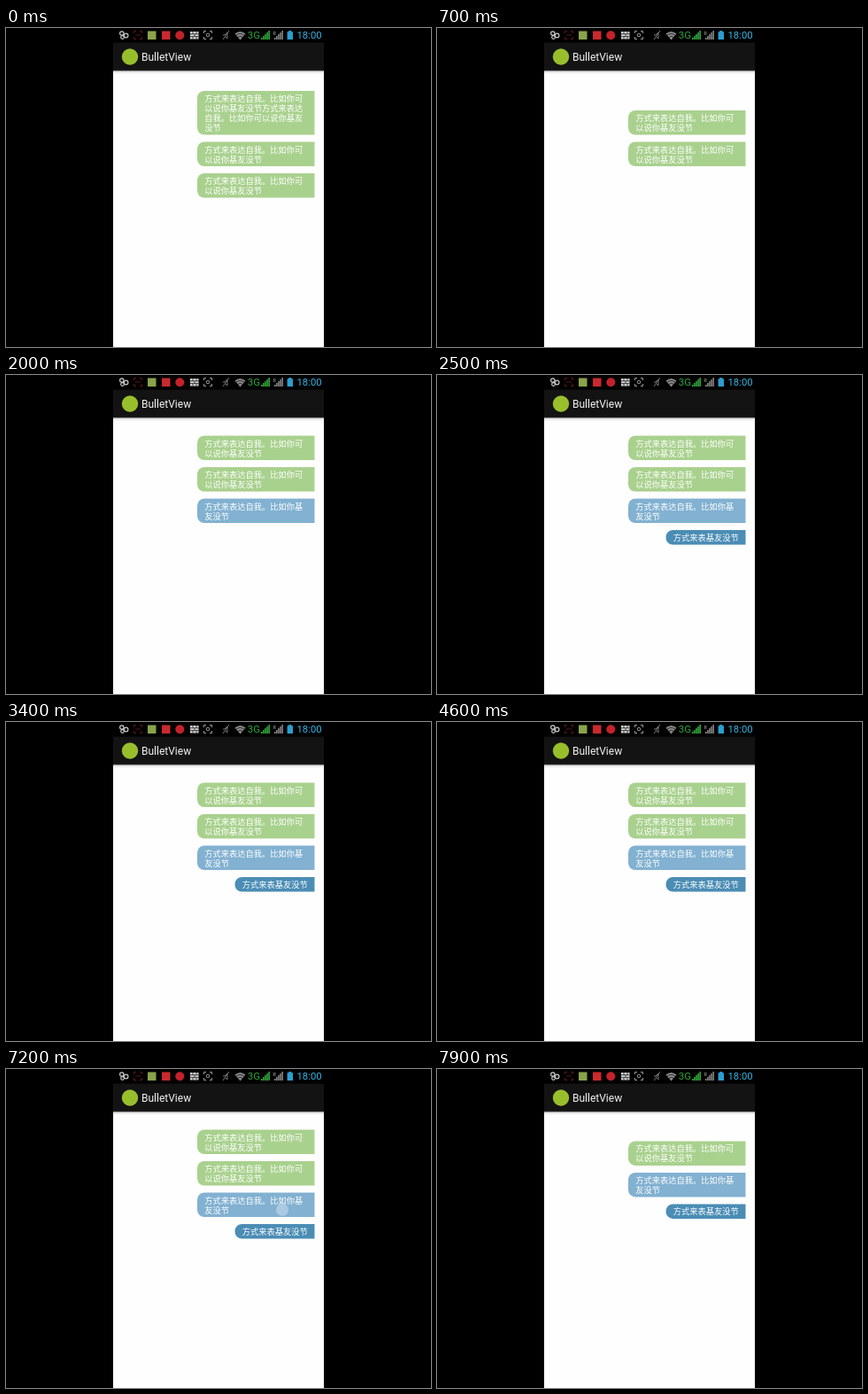
An HTML page for the animation above (8 s loop, 480 px wide and 360 px high).

```html
<!DOCTYPE html>
<html lang="zh-CN">
<head>
<meta charset="utf-8">
<title>BulletView</title>
<style>
html, body { margin: 0; width: 100%; height: 100%; overflow: hidden; background: #000; }
svg { display: block; width: 100vw; height: 100vh; }
text { font-family: Roboto, "Noto Sans", sans-serif; white-space: pre; }
.bubble text { font: 500 9.25px "Noto Sans CJK SC", "Noto Sans CJK", sans-serif; fill: #fff; }
</style>
</head>
<body>
<svg viewBox="0 0 480 360">
  <defs>
    <linearGradient id="shadow" x2="0" y2="1">
      <stop stop-color="#000" stop-opacity=".16"/>
      <stop offset="1" stop-color="#000" stop-opacity="0"/>
    </linearGradient>
  </defs>
  <rect width="480" height="360"/>
  <rect x="121" y="48" width="238" height="312" fill="#fefefe"/>
  <g id="list"></g>
  <rect x="121" y="48" width="238" height="4" fill="url(#shadow)"/>
  <rect x="121" y="16.5" width="238" height="31.7" fill="#131313"/>
  <rect x="121" y="47.4" width="238" height=".8" fill="#2b2b2b"/>
  <circle cx="140" cy="32.5" r="9.2" fill="#98bf2b"/>
  <text x="153" y="37" font-size="12" fill="#f3f3f3">BulletView</text>

  <g fill="none" stroke="#c8c8c8" stroke-width="1.2">
    <circle cx="130.8" cy="6" r="2.2"/>
    <circle cx="131.5" cy="10.5" r="1.8"/>
    <circle cx="135.6" cy="8.5" r="2.3"/>
    <g stroke="#5c1717" stroke-width="1">
      <path d="M144.5 6V3.5H147M151 3.5h2.5V6M153.5 10v2.5H151M147 12.5h-2.5V10M146 8h6"/>
    </g>
    <g stroke="#999" stroke-width="1">
      <path d="M223.5 6V3.5H226M230 3.5h2.5V6M232.5 10v2.5H230M226 12.5h-2.5V10"/>
      <circle cx="228" cy="8" r="1.8"/>
    </g>
    <path d="M245 8h2l3-3v7l-3-3M245 13l7-10" stroke="#777" stroke-width="1"/>
  </g>
  <rect x="160" y="3.5" width="9.5" height="9.5" fill="#8aa34c"/>
  <rect x="176" y="3.5" width="9.5" height="9.5" fill="#c92a2e"/>
  <circle cx="196.3" cy="8.2" r="5" fill="#c3222a"/>
  <path d="M208 4h9.5v8.5H208z" fill="#d2d2d2"/>
  <path d="M208 6.8h9.5M208 9.6h9.5M211 4v2.8M215 4v2.8M213 6.8v2.8M211 9.6v3M215 9.6v3" stroke="#222" stroke-width=".8"/>
  <path d="M258.5 6.6Q264.5 1.6 270.5 6.6L264.5 13.4Z" fill="#8b8b8b"/>
  <path d="M260 8.2q4.500-3.600 9 0M262 10.300q2.500-2 5 0" fill="none" stroke="#111" stroke-width=".8"/>
  <text x="272.800" y="12.300" font-size="11.500" fill="#2da63a">3G</text>
  <g id="signals"></g>
  <text x="301.500" y="7.500" font-size="5.500" fill="#aaa">R</text>
  <path d="M319.300 3h3v1.300h1.700V13h-6.400V4.300h1.700z" fill="#2b9fd0"/>
  <text x="328.500" y="12.300" font-size="11.300" fill="#36b4e3">18:00</text>
  <circle id="touch" cx="312" cy="159" r="7" fill="#b9d2ea" opacity=".75"/>
</svg>
<script>
const NS = "http://www.w3.org/2000/svg";
const LOOP = 8000, RIGHT = 348.5, GAP = 8, LINE = 11, GLYPH = 9.25;
const GREEN = "#a9d18e", BLUE = "#82b1d1", DEEP = "#4b8db5";
const SHORT = ["方式来表达自我。比如你可", "以说你基友没节"];

function add(parent, tag, attrs, content = "") {
  const node = document.createElementNS(NS, tag);
  for (const key in attrs) node.setAttribute(key, attrs[key]);
  node.textContent = content;
  return parent.appendChild(node);
}

const list = document.getElementById("list");
const touch = document.getElementById("touch");
const signals = document.getElementById("signals");

for (let i = 0; i < 5; i++) {
  const height = 2 + i * 2;
  add(signals, "rect", { x: 288 + i * 2.1, y: 13 - height, width: 1.5, height, fill: "#35b53f" });
  add(signals, "rect", { x: 303 + i * 2.1, y: 13 - height, width: 1.5, height, fill: "#8d8d8d" });
}

const progress = (time, start, length) => Math.max(0, Math.min(1, (time - start) / length));
const ease = u => (1 - Math.cos(Math.PI * u)) / 2;

function bubble(lines, color, top, enter = -1000, leave = LOOP) {
  const group = add(list, "g", { class: "bubble" });
  const height = lines.length * LINE + 5.5;
  const left = lines.length > 1 ? 216 : 258.5;
  const r = 8;
  add(group, "path", {
    fill: color,
    d: `M${RIGHT} 0H${left + r}A${r} ${r} 0 0 0 ${left} ${r}V${height - r}A${r} ${r} 0 0 0 ${left + r} ${height}H${RIGHT}Z`
  });
  lines.forEach((line, i) =>
    add(group, "text", { x: left + 8.3, y: 12 + i * LINE }, line));
  return { group, top, enter, leave };
}

const bubbles = [
  bubble([SHORT[0], "以说你基友没节方式来表达", "自我。比如你可以说你基友", "没节"], GREEN, 71, -1000, 50),
  bubble(SHORT, GREEN, 128.5, -1000, 7400),
  bubble(SHORT, GREEN, 164),
  bubble(["方式来表达自我。比如你基", "友没节"], BLUE, 199.5, 750),
  bubble(["方式来表基友没节"], DEEP, 235, 2050)
];

// Each arrival pushes the stack up by the new bubble's height plus the gap.
const pushes = [
  { start: 270, by: 27.5 + GAP },
  { start: 1570, by: 16.5 + GAP },
  { start: 7666, by: 27.5 + GAP }
];

function draw(time) {
  const shift = pushes.reduce((sum, p) => sum + p.by * ease(progress(time, p.start, 400)), 0);
  for (const { group, top, enter, leave } of bubbles) {
    const alpha = progress(time, enter, 300) * (1 - progress(time, leave, 250));
    group.setAttribute("transform", `translate(0 ${top - shift})`);
    group.setAttribute("opacity", alpha);
  }
  touch.setAttribute("visibility", time >= 7100 && time < 7400 ? "visible" : "hidden");
}

const begin = performance.now();
function tick() {
  draw((performance.now() - begin) % LOOP);
  requestAnimationFrame(tick);
}
tick();
</script>
</body>
</html>
```
